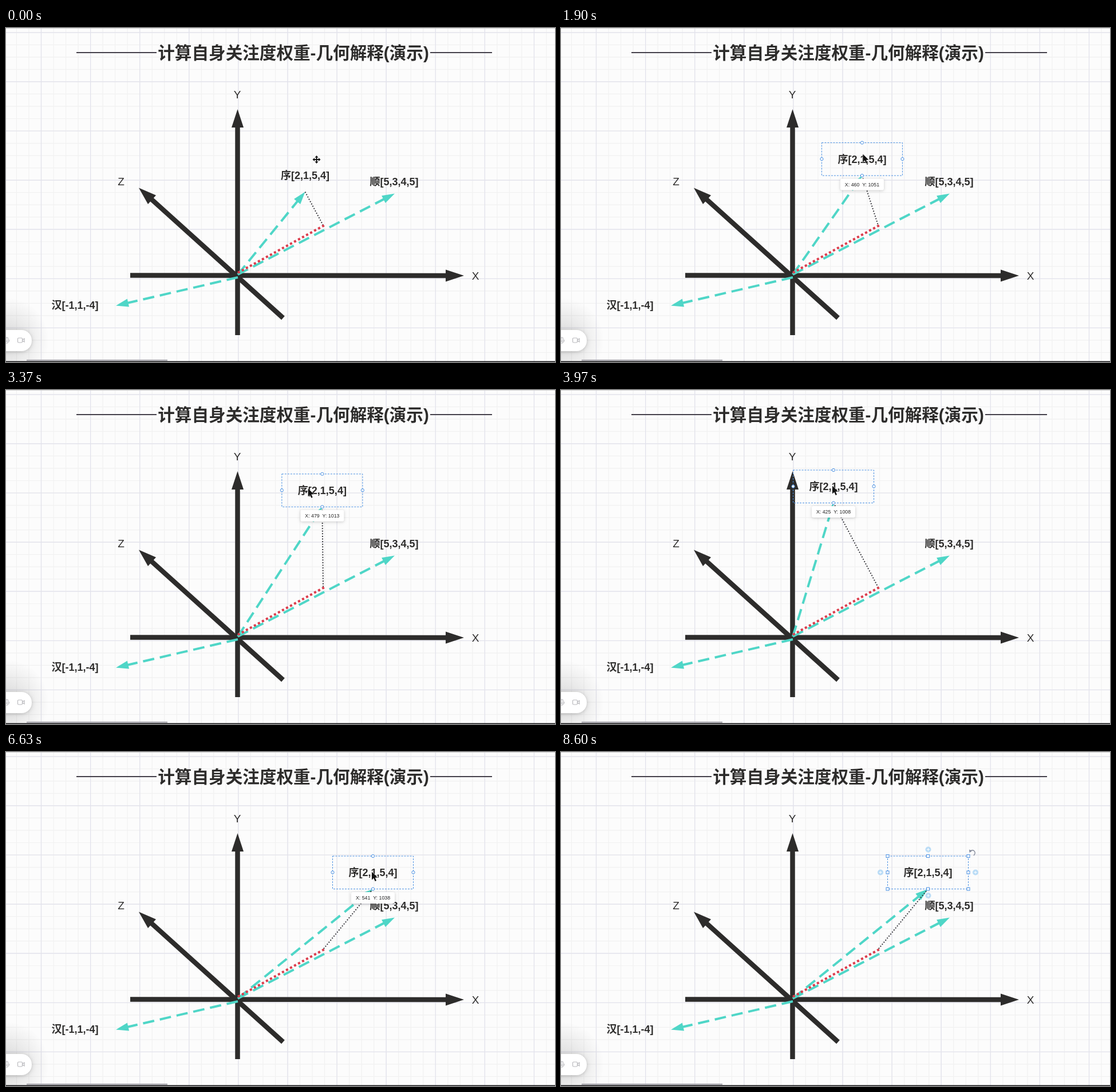
Animation of 959x584 px, one loop 8.63 s. Source, as an HTML page with a canvas:

```html
<!DOCTYPE html>
<html lang="zh-CN">
<head>
<meta charset="utf-8">
<title>几何解释</title>
<style>
  html, body { margin: 0; width: 100%; height: 100%; overflow: hidden; background: #fcfcfc; }
  canvas { display: block; }
</style>
</head>
<body>
<canvas id="stage" width="959" height="584"></canvas>
<script>
const g = document.getElementById('stage').getContext('2d');
const LOOP = 8630, SCALE = 1.417, TAU = Math.PI * 2;
const FONT = '"Liberation Sans", "Noto Sans CJK SC", "Noto Sans CJK", sans-serif';
const INK = '#2d2c2b', TEAL = '#4fd6c7', RED = '#dc3b4b', BLUE = '#4a90e2', GUIDE = '#1f7bd6';
const ORIGIN = [405, 431];
const DRAG_START = 1100, MOVE_START = 1300, DROP = 7100;

// Bottom centre of the dragged box: time, x, y
const PATH = [
  [0, 522.5, 286.5], [MOVE_START, 522.5, 286.5], [2200, 540, 238], [2670, 620.5, 208.8],
  [2800, 638, 212], [3900, 476, 197.5], [4300, 476, 197.5], [5130, 542, 206],
  [5500, 590, 224], [6300, 641, 239.5], [LOOP, 641, 239.5]
];

function slope(i, k) {
  const a = PATH[i - 1], b = PATH[i], c = PATH[i + 1];
  if (!a || !c || (b[k] - a[k]) * (c[k] - b[k]) <= 0) return 0;
  return (c[k] - a[k]) / (c[0] - a[0]);
}

function boxAt(t) {
  t = Math.min(t, LOOP - 1);
  const i = PATH.findIndex(p => p[0] > t) - 1;
  const a = PATH[i], b = PATH[i + 1], span = b[0] - a[0], u = (t - a[0]) / span;
  return [1, 2].map(k => {
    const h = u * u * (3 - 2 * u);
    return a[k] + (b[k] - a[k]) * h
      + span * u * (1 - u) * ((1 - u) * slope(i, k) - u * slope(i + 1, k));
  });
}

function line(a, b, color, width, dash = []) {
  g.strokeStyle = color;
  g.lineWidth = width;
  g.setLineDash(dash);
  g.beginPath();
  g.moveTo(...a);
  g.lineTo(...b);
  g.stroke();
  g.setLineDash([]);
}

function poly(points, fill, stroke) {
  g.beginPath();
  points.forEach(p => g.lineTo(...p));
  g.closePath();
  if (stroke) {
    g.strokeStyle = stroke;
    g.lineWidth = 1;
    g.stroke();
  }
  g.fillStyle = fill;
  g.fill();
}

function arrow(a, b, color, width, head, half, dash) {
  const len = Math.hypot(b[0] - a[0], b[1] - a[1]);
  const dx = (b[0] - a[0]) / len, dy = (b[1] - a[1]) / len;
  const base = [b[0] - dx * head, b[1] - dy * head];
  line(a, [base[0] + dx, base[1] + dy], color, width, dash);
  poly([b, [base[0] - dy * half, base[1] + dx * half], [base[0] + dy * half, base[1] - dx * half]], color);
}

function text(s, x, y, size, color = INK, weight = 'normal') {
  g.font = `${weight} ${size}px ${FONT}`;
  g.textAlign = 'center';
  g.fillStyle = color;
  g.fillText(s, x, y);
}

function panel(x, y, w, h, r, blur) {
  g.save();
  g.shadowColor = 'rgba(0,0,0,.2)';
  g.shadowBlur = blur;
  g.shadowOffsetY = 1;
  g.fillStyle = '#fff';
  g.beginPath();
  g.roundRect(x, y, w, h, r);
  g.fill();
  g.restore();
}

function dot(x, y, r, fill, stroke) {
  g.beginPath();
  g.arc(x, y, r, 0, TAU);
  g.fillStyle = fill;
  g.fill();
  if (stroke) {
    g.strokeStyle = stroke;
    g.lineWidth = 1;
    g.stroke();
  }
}

function grid() {
  g.fillStyle = '#fcfcfc';
  g.fillRect(0, 0, 959, 584);
  for (const major of [false, true]) {
    const color = major ? '#e2e2ec' : '#f1f1f1', step = major ? 86.1 : 21.525;
    for (let x = 61.5 - (major ? 0 : 43.05); x < 959; x += step) line([x, 0], [x, 584], color, 1.2);
    for (let y = 7.8; y < 584; y += step) line([0, y], [959, y], color, 1.2);
  }
}

function chrome() {
  const shade = g.createRadialGradient(0, 546, 10, 0, 546, 75);
  shade.addColorStop(0, 'rgba(90,90,90,.2)');
  shade.addColorStop(1, 'rgba(90,90,90,0)');
  g.fillStyle = shade;
  g.fillRect(0, 465, 80, 119);
  panel(-30, 528, 75, 37, 18, 6);
  g.strokeStyle = '#b9b9bd';
  g.lineWidth = 1.2;
  g.beginPath();
  g.roundRect(20.5, 542, 8, 8, 1.5);
  g.moveTo(29, 545);
  g.lineTo(32, 543);
  g.lineTo(32, 549);
  g.lineTo(29, 547);
  g.roundRect(0, 541, 3.5, 7, 1.7);
  g.moveTo(5.5, 545);
  g.arc(1.7, 546, 4, 0, Math.PI / 2);
  g.moveTo(1.7, 550);
  g.lineTo(1.7, 552);
  g.stroke();
  line([0, .5], [959, .5], '#d2d2d2', 1);
  line([36, 581], [282, 581], '#aaa9b0', 2.5);
  line([0, 583.3], [959, 583.3], '#19191b', 1.5);
}

function diagram(tip) {
  line([123, 43], [263, 43], '#45414b', 2);
  line([741, 43], [849, 43], '#45414b', 2);
  text('计算自身关注度权重-几何解释(演示)', 502, 54, 29.6, INK, 'bold');

  arrow([404.5, 537], [404.5, 142], INK, 8.5, 32, 10.5);
  arrow([217, 432.5], [800, 433], INK, 8.5, 32, 10.5);
  arrow([484, 507], [232, 279.5], INK, 8.5, 31, 10.5);
  text('Y', 404, 122.5, 19);
  text('Z', 201, 274.5, 19);
  text('X', 820, 439.5, 19);

  const vector = (from, to) => arrow(from, to, TEAL, 4, 22, 7.2, [20, 10]);
  vector([405, 436], [192, 485.5]);
  vector(ORIGIN, [679, 289.5]);
  vector(ORIGIN, tip);
  line(tip, [554, 345], '#3b3b40', 2, [2, 2.6]);
  line([405, 428], [556, 345], RED, 4, [4, 4]);

  text('顺[5,3,4,5]', 678, 274.5, 18, INK, 'bold');
  text('汉[-1,1,-4]', 120.5, 491, 18, INK, 'bold');
  text('序[2,1,5,4]', tip[0], tip[1] - 22.5, 18, INK, 'bold');
}

function outline(x, y) {
  g.strokeStyle = BLUE;
  g.lineWidth = 1;
  g.setLineDash([3, 2]);
  g.strokeRect(x - 70.5, y - 57.5, 141, 57.5);
  g.setLineDash([]);
}

function guides(x, y) {
  if (Math.abs(y - 286.5) < 1.5) {
    line([233, y], [x + 70, y], GUIDE, 1, [2, 2]);
    text('150px', 346, y + 7.5, 17, GUIDE);
  }
  if (Math.abs(x - 542) < 4 && y < 225) {
    line([x + 71, y - 57], [x + 71, y + 17], BLUE, 1, [2, 2]);
    text(Math.round((240 - y) / SCALE) + 'px', x + 72, y + 32, 17, GUIDE);
  }
}

function dragInfo(x, y) {
  const sides = [[0, -57.5], [70.5, -29], [0, 0], [-70.5, -29]];
  panel(x - 38, y + 5.5, 76, 20, 3, 5);
  const left = Math.round(425 + (x - 476) / SCALE), top = Math.round(1008 + (y - 197.5) / SCALE);
  text(`X: ${left}\u00a0\u00a0Y: ${top}`, x, y + 18.8, 8.8, '#222');
  for (const [dx, dy] of sides) dot(x + dx, y + dy, 2.6, '#fff', BLUE);
}

function selection(x, y) {
  for (const dx of [-70.5, 0, 70.5]) for (const dy of [-57.5, -29, 0]) {
    if (dx === 0 && dy === -29) continue;
    g.fillStyle = '#fff';
    g.strokeStyle = BLUE;
    g.lineWidth = 1;
    g.fillRect(x + dx - 2.5, y + dy - 2.5, 5, 5);
    g.strokeRect(x + dx - 2.5, y + dy - 2.5, 5, 5);
  }
  for (const [dx, dy] of [[.5, -69], [83, -29], [.5, 11.5], [-83, -29]]) {
    const px = x + dx, py = y + dy;
    dot(px, py, 5, 'rgba(174,214,245,.85)');
    line([px - 2.5, py], [px + 2.5, py], '#fff', 1);
    line([px, py - 2.5], [px, py + 2.5], '#fff', 1);
  }
  g.strokeStyle = '#858b9b';
  g.lineWidth = 1.4;
  g.beginPath();
  g.arc(x + 77.5, y - 63, 4.7, -2.4, 1.1);
  g.stroke();
  poly([[x + 72, y - 69], [x + 72.5, y - 63.5], [x + 77, y - 66.5]], '#858b9b');
}

function moveCursor(x, y) {
  g.save();
  g.translate(x, y);
  for (let i = 0; i < 4; i++) {
    poly([[0, -7], [3, -3.5], [1, -3.5], [1, 0], [-1, 0], [-1, -3.5], [-3, -3.5]], '#111');
    g.rotate(TAU / 4);
  }
  g.restore();
}

function pointer(x, y) {
  const shape = [[0, 0], [0, 14], [3.3, 11], [5.7, 16.5], [8, 15.5], [5.7, 10.2], [10, 10]];
  poly(shape.map(([dx, dy]) => [x + dx, y + dy]), '#111', '#fff');
}

function cursor(t) {
  if (t < DRAG_START) {
    const u = Math.max(0, Math.min(1, (t - 250) / 650)), e = u * u * (3 - 2 * u);
    moveCursor(542.5 - 21 * e, 230 + 21 * e);
  } else if (t < DROP + 250) {
    // The box trails the pointer slightly
    const [x, y] = boxAt(t + 105);
    pointer(x - 2, y - (t < MOVE_START ? 35 : 30));
  }
}

function draw(t) {
  const [x, y] = boxAt(t);
  grid();
  diagram([x, y]);
  if (t >= DRAG_START) {
    outline(x, y);
    if (t < DROP) {
      guides(x, y);
      if (t > MOVE_START) dragInfo(x, y);
    } else {
      selection(x, y);
    }
  }
  chrome();
  cursor(t);
}

const start = performance.now();
function tick() {
  draw((performance.now() - start) % LOOP);
  requestAnimationFrame(tick);
}
tick();
</script>
</body>
</html>
```
